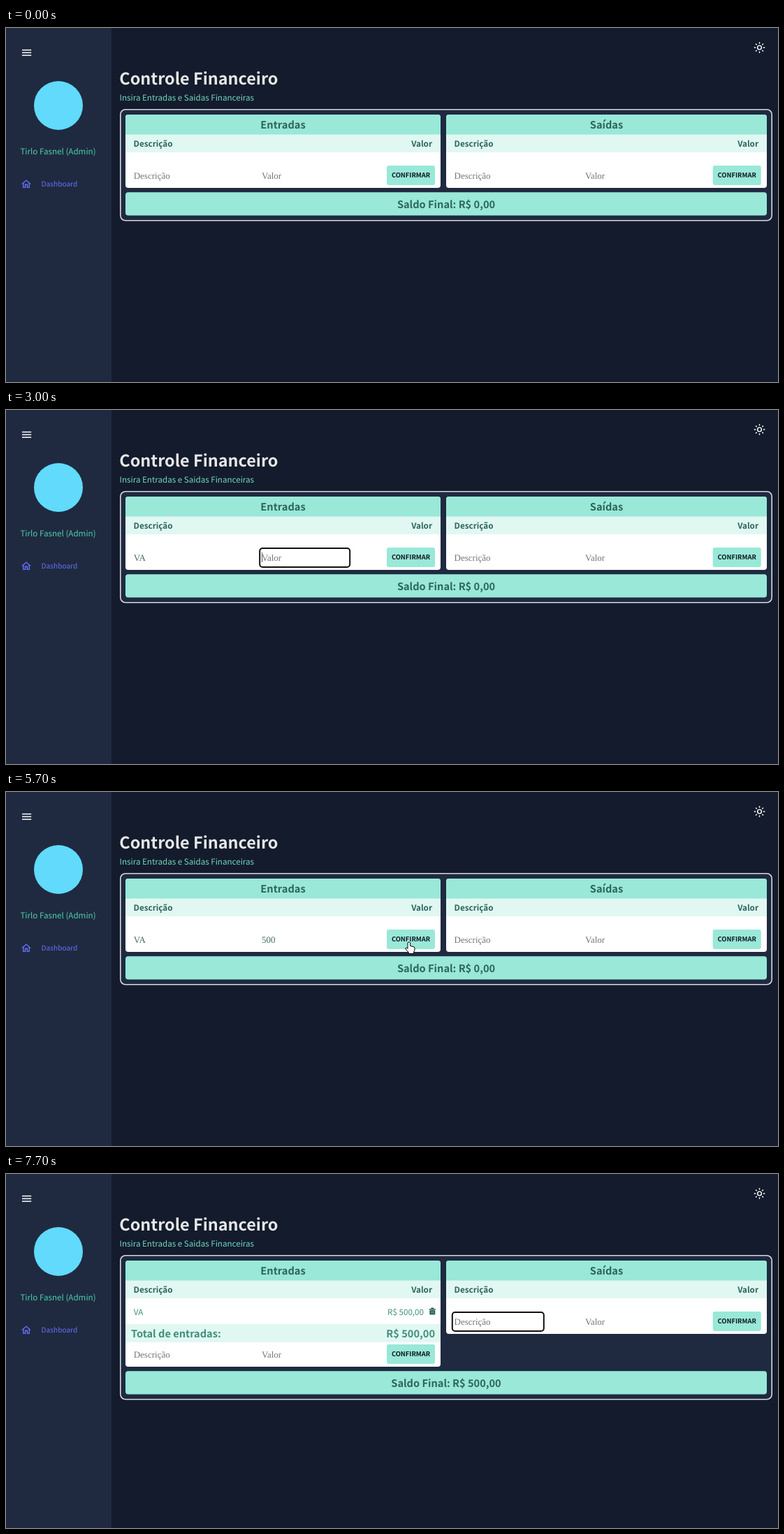
Animation, 1105 px wide and 507 px high, one loop 8000 ms. Source, as an HTML page with a canvas:

```html
<!DOCTYPE html>
<html lang="pt-BR">
<head>
<meta charset="utf-8">
<title>Controle Financeiro</title>
<style>
  html, body { margin: 0; width: 100%; height: 100%; overflow: hidden; background: #141b2d; }
  canvas { display: block; }
</style>
</head>
<body>
<canvas id="stage" width="1105" height="507"></canvas>
<script>
const ctx = document.getElementById('stage').getContext('2d');
const LOOP = 8000, STEP = 100;
const SANS = '"Noto Sans CJK JP", "Noto Sans CJK SC", "Noto Sans CJK KR", "Noto Sans CJK", sans-serif';
const SERIF = '"Liberation Serif", serif';
const C = {
  page: '#141b2d', panel: '#1f2a40', mint: '#99e8d8', pale: '#e1f7f2', dark: '#2d655d',
  mid: '#3f8f7b', hint: '#757575', typed: '#436b65', ink: '#101820', white: '#ffffff'
};

// Each entry: time, x, y, kind; an entry without a position hides the pointer.
const POINTER = [
  [200, 405, 88, 'arrow'], [300, 362, 110, 'arrow'], [400, 308, 154, 'arrow'],
  [500, 272, 182, 'arrow'], [600],
  [4800, 446, 227, 'arrow'], [4900, 490, 245, 'arrow'], [5000, 535, 250, 'arrow'],
  [5100, 588, 219, 'hand'], [5300, 584, 218, 'hand'], [5400, 581, 217, 'hand'],
  [5500, 579, 216, 'hand'], [5600, 577, 215, 'hand'], [5800],
  [6600, 793, 202, 'arrow'], [6700]
];
const ARROW = [[0, 0], [0, 13], [3, 10.3], [5, 15], [7, 14.2], [5.1, 9.7], [9.3, 9.5]];
const HAND = [[-2, 1], [-0.9, 0], [0.6, 0], [1.6, 1], [1.6, 5.4], [7, 6.8], [8, 8.2], [8, 11],
  [6.6, 14.4], [6.6, 16.4], [-0.4, 16.4], [-0.9, 14.5], [-5, 10], [-5, 8.5], [-3.5, 8], [-2, 9.4]];

function box(x, y, w, h, color, r = 0) {
  ctx.fillStyle = color;
  ctx.beginPath();
  ctx.roundRect(x, y, w, h, r);
  ctx.fill();
}

function text(str, x, y, size, color, { align = 'left', bold = false, family = SANS } = {}) {
  ctx.font = `${bold ? 700 : 400} ${size}px ${family}`;
  ctx.textRendering = 'geometricPrecision';
  ctx.textAlign = align;
  ctx.fillStyle = color;
  ctx.fillText(str, x, y);
}

function at(x, y, scale, draw) {
  ctx.save();
  ctx.translate(x, y);
  ctx.scale(scale, scale);
  draw();
  ctx.restore();
}

function sun() {
  ctx.strokeStyle = C.white;
  ctx.lineWidth = 2;
  ctx.lineCap = 'round';
  ctx.beginPath();
  ctx.arc(0, 0, 4, 0, Math.PI * 2);
  ctx.stroke();
  for (let i = 0; i < 8; i++) {
    const a = i * Math.PI / 4, c = Math.cos(a), s = Math.sin(a);
    ctx.beginPath();
    ctx.moveTo(c * 8.2, s * 8.2);
    ctx.lineTo(c * 10, s * 10);
    ctx.stroke();
  }
}

function home() {
  ctx.fillStyle = '#6870fa';
  ctx.fill(new Path2D('M0-6.3 5-1.8V6H3V0H-3V6H-5V-1.8ZM0-9-10 0H-7V8H-1V2H1V8H7V0H10Z'), 'evenodd');
}

function sidebar() {
  box(0, 0, 151, 507, C.panel);
  for (let i = 0; i < 3; i++) box(23, 30.8 + i * 3.8, 13.2, 1.5, C.white);
  ctx.fillStyle = '#61dafb';
  ctx.beginPath();
  ctx.arc(75, 111, 35, 0, Math.PI * 2);
  ctx.fill();
  text('Tirlo Fasnel (Admin)', 74.5, 181, 11.64, '#4cceac', { align: 'center' });
  at(29, 223.5, 0.7, home);
  text('Dashboard', 50.6, 226.8, 10.15, '#6870fa');
}

function button(x, y) {
  box(x, y, 69, 28, C.mint, 3);
}

function buttonLabel(x, y) {
  text('CONFIRMAR', x + 34.5, y + 17.4, 9.35, C.ink, { align: 'center', bold: true });
}

function ripple(t) {
  const p = (t - 5800) / 500;
  if (p < 0 || p >= 1) return;
  ctx.save();
  ctx.beginPath();
  ctx.roundRect(545, 244, 69, 28, 3);
  ctx.clip();
  ctx.fillStyle = `rgba(16, 24, 32, ${0.2 * (1 - p)})`;
  ctx.beginPath();
  ctx.arc(576, 262, 16 + 32 * p, 0, Math.PI * 2);
  ctx.fill();
  ctx.restore();
}

function card(x, w, h, title) {
  box(x, 124, w, h, C.white, 4);
  box(x, 124, w, 29, C.mint, [4, 4, 0, 0]);
  box(x, 152.5, w, 25.5, C.pale);
  text(title, x + w / 2, 144, 14.6, C.dark, { align: 'center', bold: true });
  text('Descrição', x + 11.6, 169.5, 11.7, C.dark, { bold: true });
  text('Valor', x + w - 12, 169.5, 11.7, C.dark, { align: 'right', bold: true });
}

// focus: null, or { w, since } with the outline width and the caret's blink start
function field(x, y, value, hint, focus, t) {
  if (focus) {
    ctx.strokeStyle = '#101010';
    ctx.lineWidth = 2;
    ctx.beginPath();
    ctx.roundRect(x - 2.8, y - 18, focus.w - 2, 27, 4);
    ctx.stroke();
  }
  text(value || hint, x, y, 13, value ? C.typed : C.hint, { family: SERIF });
  if (focus && (t - focus.since) % 1000 < 500) {
    const w = value ? ctx.measureText(value).width : 0;
    box(Math.round(x + w), y - 12, 1, 14, C.typed);
  }
}

function typed(t, keys) {
  return keys.filter(k => t >= k[0]).map(k => k[1]).join('');
}

function latest(t, times) {
  return times.filter(v => v <= t).pop();
}

function trash() {
  box(605.5, 193, 9.5, 1.5, C.dark, 0.5);
  box(608.3, 191.6, 4, 1.8, C.dark, 0.6);
  box(606.3, 195, 8, 6.6, C.dark, 1.2);
  box(608.8, 196.6, 0.8, 3.2, '#8db8ae');
  box(611.2, 196.6, 0.8, 3.2, '#8db8ae');
}

function entry() {
  text('VA', 182.8, 202.2, 11.64, C.mid);
  text('R$ 500,00', 598, 202.2, 11.64, C.mid, { align: 'right' });
  trash();
  box(171, 215, 451, 26, C.pale);
  text('Total de entradas:', 179, 234, 14.6, C.mid, { bold: true });
  text('R$ 500,00', 614, 234, 14.6, C.mid, { align: 'right', bold: true });
}

function pointer(t) {
  const now = POINTER.filter(p => p[0] <= t).pop();
  if (!now || now.length < 2) return;
  const shape = now[3] === 'hand' ? HAND : ARROW;
  at(now[1], now[2], 1, () => {
    ctx.beginPath();
    shape.forEach(([x, y]) => ctx.lineTo(x, y));
    ctx.closePath();
    ctx.lineJoin = 'round';
    ctx.lineWidth = 1;
    ctx.fillStyle = C.white;
    ctx.strokeStyle = '#000';
    ctx.fill();
    ctx.stroke();
  });
}

function draw(t) {
  const added = t >= 5800, drop = added ? 47 : 0;
  const name = added ? '' : typed(t, [[2000, 'V'], [2500, 'A']]);
  const amount = added ? '' : typed(t, [[3700, '5'], [3900, '0'], [4100, '0']]);
  const onName = t >= 1100 && t < 3000 && { w: 130, since: latest(t, [1000, 2000, 2500]) };
  const onAmount = t >= 3000 && t < 5700 && { w: 131, since: latest(t, [3000, 3700, 3900, 4100]) };
  const onExpense = t >= 7300 && { w: 133, since: 7200 };

  box(0, 0, 1105, 507, C.page);
  sidebar();
  at(1078.5, 28, 0.72, sun);
  text('Controle Financeiro', 162.3, 80.5, 23.4, '#e6e8e6', { bold: true });
  text('Insira Entradas e Saidas Financeiras', 162.6, 104, 11.62, '#70d8bd');

  box(163, 116, 934, 160.5 + drop, '#d6d9dc', 8);
  box(164.6, 117.6, 930.8, 157.3 + drop, C.panel, 6.5);

  card(171, 451, 105 + drop, 'Entradas');
  if (added) entry();
  field(182.7, 216 + drop, name, 'Descrição', onName, t);
  field(366, 216 + drop, amount, 'Valor', onAmount, t);
  button(545, 197 + drop);
  ripple(t);
  buttonLabel(545, 197 + drop);

  card(630, 459, 105, 'Saídas');
  field(641.6, 216, '', 'Descrição', onExpense, t);
  field(829, 216, '', 'Valor', null, t);
  button(1011.7, 197);
  buttonLabel(1011.7, 197);

  box(171, 235.3 + drop, 918, 33.2, C.mint, 4);
  text(`Saldo Final: R$ ${added ? '500,00' : '0,00'}`, 630, 257.5 + drop, 14.6, C.dark,
    { align: 'center', bold: true });
  pointer(t);
}

const start = performance.now();
function tick() {
  const t = (performance.now() - start) % LOOP;
  draw(Math.floor(t / STEP) * STEP);
  requestAnimationFrame(tick);
}
tick();
</script>
</body>
</html>
```
